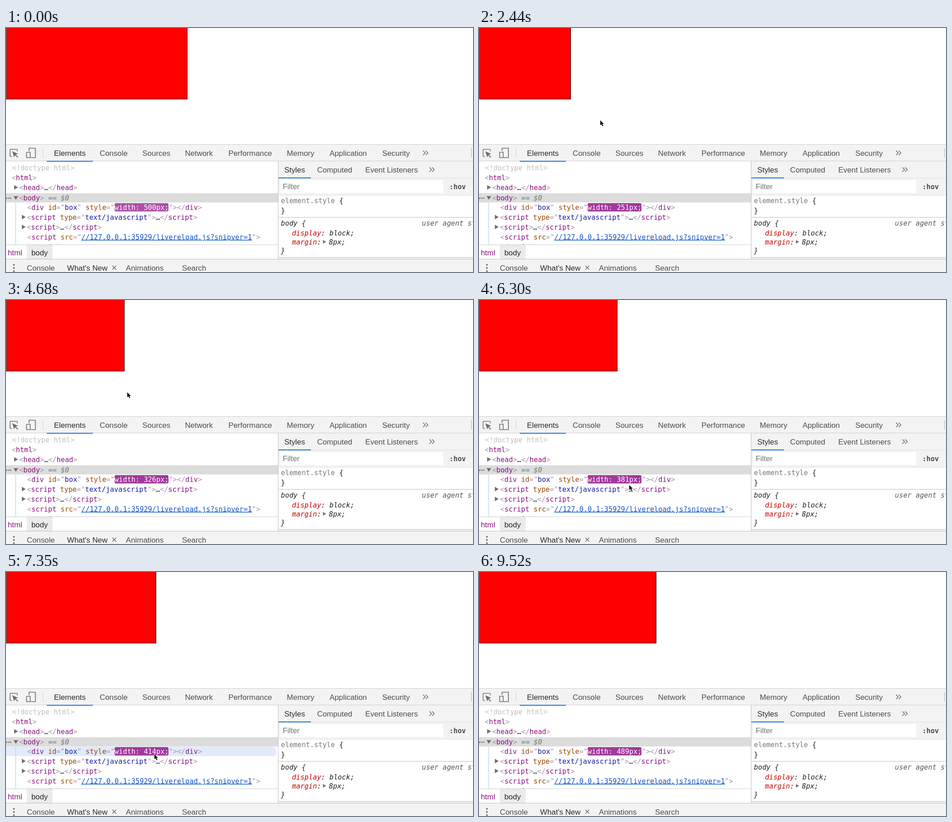
Write an HTML page that moves like this. It is 1032 px wide and 542 px high and loops after 9.62 s.

```html
<!DOCTYPE html>
<html lang="en">
<head>
<meta charset="utf-8">
<title>Box width</title>
<style>
html, body { margin: 0; width: 100%; height: 100%; overflow: hidden; background: #fff; }
svg { display: block; }
text { white-space: pre; }
.ui { font: 16.85px "Liberation Sans", Arial, sans-serif; }
.code { font: 15.27px "DejaVu Sans Mono", monospace; }
.it { font-style: italic; }
</style>
</head>
<body>
<svg id="stage" width="1032" height="542" viewBox="0 0 1032 542"></svg>
<script>
const stage = document.getElementById('stage');
const LOOP = 9620;
const C = {
  tag: '#881280', punct: '#a894a6', attr: '#994500', value: '#1a1aa6',
  link: '#1155cc', ink: '#282828', tab: '#4c4c4c', bar: '#f3f3f3',
  line: '#cccccc', blue: '#1a73e8', prop: '#c80000', icon: '#6e6e6e'
};

const esc = s => s.replace(/&/g, '&amp;').replace(/</g, '&lt;');
const rect = (x, y, w, h, fill, extra = '') =>
  `<rect x="${x}" y="${y}" width="${w}" height="${h}" fill="${fill}" ${extra}/>`;
const path = (d, fill, extra = '') => `<path d="${d}" fill="${fill}" ${extra}/>`;
const stroke = (d, color, width = 1) => path(d, 'none', `stroke="${color}" stroke-width="${width}"`);
const ui = (x, y, s, fill = C.tab) => `<text class="ui" x="${x}" y="${y}" fill="${fill}">${esc(s)}</text>`;
const code = (x, y, runs, cls = '') => `<text class="code ${cls}" x="${x}" y="${y + .5}">` +
  runs.map(([s, color, extra = '']) => `<tspan fill="${color}" ${extra}>${esc(s)}</tspan>`).join('') + '</text>';
const dot = (x, y, r, fill) => `<circle cx="${x}" cy="${y}" r="${r}" fill="${fill}"/>`;
const closed = (x, y, s = 1) => path(`M${x} ${y - 5 * s}l${8.5 * s} ${5 * s}l${-8.5 * s} ${5 * s}z`, C.icon);

const open = name => [['<', C.punct], [name, C.tag]];
const end = name => [['</', C.punct], [name, C.tag], ['>', C.punct]];
const attr = (name, value, color = C.value, extra = '') =>
  [[' ' + name, C.attr], ['="', C.punct], [value, color, extra], ['"', C.punct]];
const gt = ['>', C.punct], more = ['…', C.ink];

const page = rect(0, 0, 1032, 259, '#fff') +
  rect(1, -10, 399.5, 168, '#f00', 'id="box" stroke="#000"');

const toolbar = rect(0, 259, 1032, 37, C.bar) +
  stroke('M0 258.5H1032M0 295.5H1032', C.line) +
  stroke('M81.5 267V288', C.line) + stroke('M1028.5 267V288', '#aaa') +
  stroke('M13 285.500H11Q9 285.500 9 283.500V271.500Q9 269.500 11 269.500H23Q25 269.500 25 271.500V274', C.icon, 1.6) +
  path('M14 274L27 279.500L21.700 281.300L27 286.600L25.500 288L20.200 282.700L18 287z', C.icon) +
  stroke('M51 273V267H65V288H55', C.icon, 1.7) + stroke('M45.500 276H53.500V288H45.500z', C.icon, 1.7) +
  [[106, 'Elements', C.ink], [207, 'Console'], [301.5, 'Sources'], [395.5, 'Network'], [491.5, 'Performance'],
   [620.5, 'Memory'], [715, 'Application'], [831.5, 'Security']].map(([x, s, c]) => ui(x, 284, s, c)).join('') +
  stroke('M921.500 272.500L926.500 277.500L921.500 282.500M927.500 272.500L932.500 277.500L927.500 282.500', C.icon, 1.6);

const tree = rect(0, 296, 601, 186, '#fff') +
  rect(90, 295, 102, 2, C.blue) +
  rect(0, 367, 601, 20.5, '#dcdcdc') +
  rect(-8, 410, 605, 21, '#e1ebfb', 'id="hover" rx="7"') +
  stroke('M21.500 388V481', '#a9c8ef') +
  code(13.5, 315, [['<!doctype html>', '#c0c0c0']]) +
  code(12.5, 337, [...open('html'), gt]) +
  closed(18, 354) + code(29, 359, [...open('head'), gt, more, ...end('head')]) +
  [1.5, 6, 10.5].map(x => dot(x, 378, 1.5, C.icon)).join('') +
  path('M16.500 373.500H27L21.750 381.500z', C.icon) +
  code(29, 382, [...open('body'), gt]) + code(93.5, 382, [['== $0', '#777']], 'it') +
  rect(240, 389, 119, 18.5, '#a1379b', 'id="flash" rx="3"') +
  code(47, 403, [...open('div'), ...attr('id', 'box'), ...attr('style', 'width: 500px;', '#fff', 'id="width"'), gt, ...end('div')]) +
  closed(35, 420) + code(46, 425, [...open('script'), ...attr('type', 'text/javascript'), gt, more, ...end('script')]) +
  closed(35, 442) + code(46, 447, [...open('script'), gt, more, ...end('script')]) +
  code(47, 469, [...open('script'),
    ...attr('src', '//127.0.0.1:35929/livereload.js?snipver=1', C.link, 'text-decoration="underline"'), gt]) +
  code(47, 491, end('script'));

const crumbs = rect(0, 481, 601, 33, '#fff') + rect(46, 482, 57, 31, '#ebebeb') +
  stroke('M0 481.500H601', C.line) + ui(4, 505, 'html', C.tag) + ui(56, 505, 'body', C.ink);

const styles = rect(602, 296, 430, 218, '#fff') +
  rect(602, 296, 430, 75, C.bar) + stroke('M602 333.500H1032M602 371.500H1032', '#ddd') +
  ui(615, 321, 'Styles', C.ink) + ui(687.5, 321, 'Computed') + ui(794, 321, 'Event Listeners') +
  stroke('M935.500 309.500L940.500 314.500L935.500 319.500M941.500 309.500L946.500 314.500L941.500 319.500', C.icon, 1.6) +
  rect(602, 332, 72, 2, C.blue) +
  rect(606, 338, 360, 28.5, '#fff') + ui(611.5, 358, 'Filter', '#707070') +
  code(979.5, 357, [[':hov', C.tab, 'font-weight="bold"']]) +
  code(607.5, 388, [['element.style', '#777'], [' {', '#222']]) + code(607.5, 410, [['}', '#222']]) +
  stroke('M602 420.500H1032', '#bbb') +
  code(607.5, 438, [['body {', '#222']], 'it') + code(919, 438, [['user agent stylesheet', '#555']], 'it') +
  code(632, 460, [['display', C.prop], [': block;', '#222']], 'it') +
  code(632, 480, [['margin', C.prop], [':', '#222']], 'it') + closed(700.5, 475, .8) +
  code(713.5, 480, [['8px;', '#222']], 'it') + code(607.5, 499, [['}', '#222']], 'it') +
  rect(602, 509, 430, 5, C.bar) + stroke('M602 509.500H1032', '#bbb') +
  stroke('M601.500 296V513', '#bbb');

const drawer = rect(0, 513, 1032, 29, C.bar) + stroke('M0 513.500H1032', '#bbb') +
  [526, 533, 540].map(y => dot(17.5, y, 1.9, C.icon)).join('') +
  ui(46, 539, 'Console') + ui(135, 539, "What's New", C.ink) +
  stroke('M235 528L243.500 536.500M243.500 528L235 536.500', C.icon, 1.6) +
  ui(265, 539, 'Animations') + ui(389, 539, 'Search');

const pointer = path('M0 0V11L2.600 8.700L4.600 13L6.500 12.200L4.500 8H7.800z', '#000',
  'id="pointer" stroke="#fff" stroke-width="1.200" paint-order="stroke"');

stage.innerHTML = page + toolbar + tree + crumbs + styles + drawer + pointer;
const [box, hover, flash, width, arrow] =
  ['box', 'hover', 'flash', 'width', 'pointer'].map(id => document.getElementById(id));

// Screen refreshes: even steps inside each [start, end, count] span, on a 10 ms clock.
const ticks = [0, ...[[140, 1020, 7], [1200, 2150, 7], [2290, 3190, 7], [3340, 4380, 8], [4530, 5570, 8],
  [5720, 6600, 7], [6780, 7800, 7], [7950, 8840, 7], [9020, 9200, 2]].flatMap(([a, b, n]) =>
  Array.from({ length: n }, (_, i) => Math.floor((a + (b - a) * i / (n - 1)) / 10) * 10)), 9520];

const widths = [[0, 169.3], [2440, 251], [4680, 326], [6300, 381], [6600, 390], [8090, 442], [9520, 489]];
const pointerPath = [[300, 1040, 490], [900, 300, 250], [1200, 268, 205], [5850, 268, 205], [6280, 332, 411],
  [6320, 332, 411], [6580, 328, 405], [7350, 328, 405], [7950, 453, 217], [8250, 453, 217], [8750, 1040, 465]];

function at(keys, t, col = 1) {
  const i = keys.findIndex(k => k[0] > t);
  if (i === 0) return keys[0][col];
  if (i < 0) return keys[keys.length - 1][col];
  const a = keys[i - 1], b = keys[i];
  return a[col] + (b[col] - a[col]) * (t - a[0]) / (b[0] - a[0]);
}

function boxState(t) {
  if (t < 700) return { w: 500, edge: 400.5 };
  if (t < 1500) return { w: 15 + (t - 720) * .0335, edge: 13.5 + (t - 720) * .02665 };
  return { w: at(widths, t), edge: 137.4 + t * .02665 };
}

function draw(time) {
  const t = ticks.filter(k => k <= time).pop();
  const { w, edge } = boxState(t);
  const px = Math.round(w);
  box.setAttribute('width', Math.floor(edge) - .5);
  width.textContent = `width: ${px}px;`;
  flash.setAttribute('fill', px % 10 ? '#a1379b' : '#ae50a8');
  hover.setAttribute('visibility', t >= 6600 && t < 7600 ? 'visible' : 'hidden');
  hover.setAttribute('y', t < 6780 ? 410 : 388);
  arrow.setAttribute('transform', `translate(${at(pointerPath, t)} ${at(pointerPath, t, 2)})`);
}

function frame() {
  draw(performance.now() % LOOP);
  requestAnimationFrame(frame);
}
frame();
</script>
</body>
</html>
```
